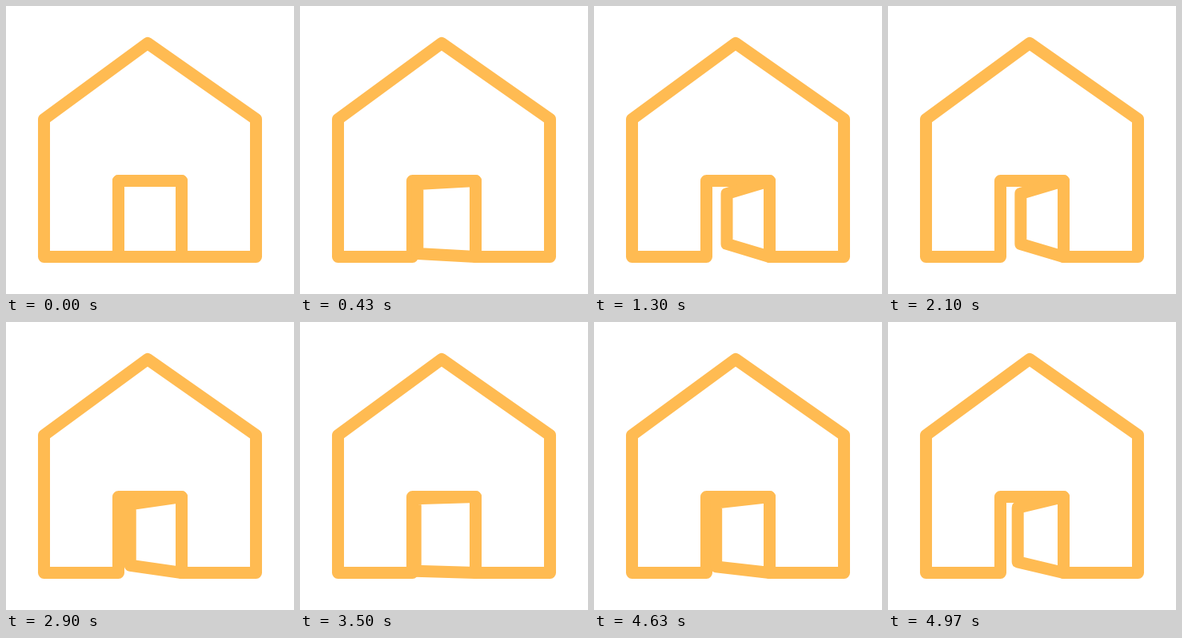
Write an HTML page that moves like this. It is 360 by 360 pixels and loops after 5 s.

```html
<!DOCTYPE html>
<html lang="en">
<head>
<meta charset="utf-8">
<title>House with a swinging door</title>
<style>
  html, body { margin: 0; width: 100%; height: 100%; overflow: hidden; background: #fff; }
  svg { display: block; width: 100%; height: 100%; }
  path { fill: none; stroke: #ffbb52; stroke-width: 15; stroke-linecap: round; stroke-linejoin: round; }
</style>
</head>
<body>
<svg viewBox="0 0 360 360">
  <path d="M140.5 313.5H47.5V141.5L177 46.5L312.5 141.5V313.5H219.5V218.5H140.5Z"/>
  <path id="door"/>
</svg>
<script>
  const LOOP = 5000, CYCLE = 4000;
  const OPEN_TIME = 1300, CLOSE_START = 2000;
  const SWING = 25.5, RISE = 0.63;
  const LEFT = 140.5, RIGHT = 219.5, TOP = 218.5, BOTTOM = 313.5;
  const door = document.getElementById('door');

  const ease = p => (1 - Math.cos(Math.PI * Math.min(1, Math.max(0, p)))) / 2;

  // Opens quickly, rests, closes slowly; the loop cuts off the second opening.
  function openness(time) {
    const t = time % CYCLE;
    return t < CLOSE_START
      ? ease(t / OPEN_TIME)
      : 1 - ease((t - CLOSE_START) / (CYCLE - CLOSE_START));
  }

  function draw(now) {
    const dx = SWING * openness(now % LOOP);
    const dy = dx * RISE;
    door.setAttribute('d',
      `M${RIGHT} ${TOP}L${LEFT + dx} ${TOP + dy}V${BOTTOM - dy}L${RIGHT} ${BOTTOM}Z`);
    requestAnimationFrame(draw);
  }

  draw(0);
</script>
</body>
</html>
```
